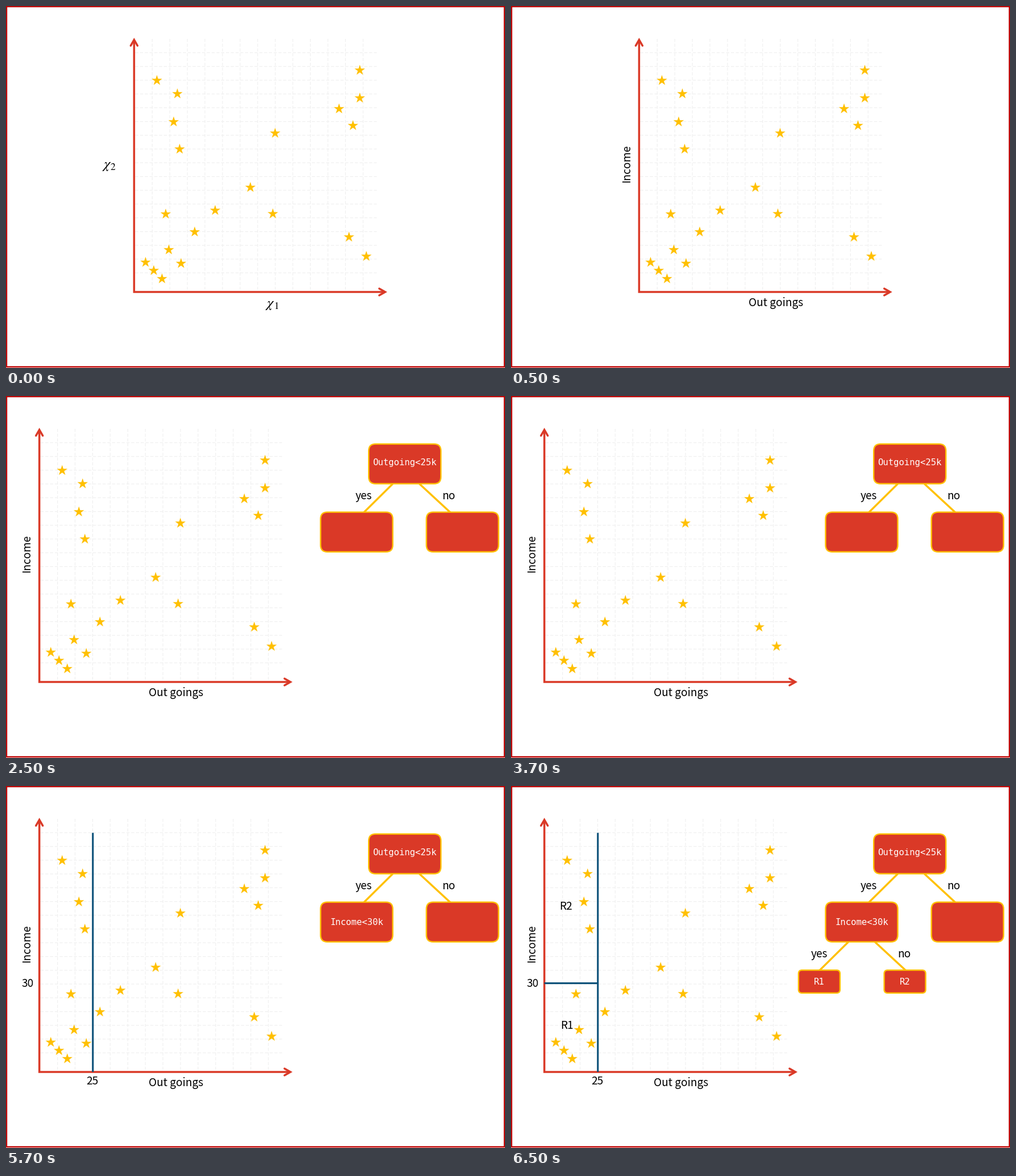
Recreate the animation shown at these times as a matplotlib script. Size 878 px wide and 638 px high, loop 8 s.

```python
import numpy as np
import matplotlib.pyplot as plt
from matplotlib.animation import FuncAnimation
from matplotlib.patches import FancyBboxPatch, Polygon, Rectangle

W, H, DPI = 878, 638, 64
PT = 72 / DPI  # points per pixel
RED, GOLD, BLUE, BORDER = "#DA3927", "#FFC000", "#0B5078", "#C00000"
SANS, MONO = "Noto Sans CJK JP", "DejaVu Sans Mono"
ORIGIN_X, ORIGIN_Y = 225.4, 504
SHIFT = -166.7  # the chart makes room for the tree
SPLIT_X, SPLIT_Y = 152.8, 347.6

# Customers: a steady low run, then the scattered ones from left to right.
STARS = [(245 + 14.5 * k, 450.5 + 14.5 * k) for k in range(3)] + [
    (265, 130), (280.5, 365.5), (286, 428.5), (294.5, 203), (301, 153.5),
    (305, 251), (307.5, 452.5), (331.5, 397), (367.5, 359), (429.5, 318.5),
    (469, 365), (473, 223), (585.5, 180), (603, 406), (610, 209.5),
    (622, 112), (622, 161), (633.5, 440)]

plt.rcParams["path.snap"] = False
fig = plt.figure(figsize=(W / DPI, H / DPI), dpi=DPI, facecolor="white")
ax = fig.add_axes([0, 0, 1, 1])


def line(points, color, width, z=2, **style):
    xs, ys = zip(*points)
    style = {"solid_capstyle": "butt", **style}
    ax.plot(xs, ys, color=color, lw=width * PT, zorder=z, **style)


def label(x, y, text, size=19.1, color="black", font=SANS, **style):
    ax.text(x, y, text, fontsize=size * PT, color=color, family=font,
            ha="center", va="baseline", zorder=5, **style)


def chi(x, y, index):
    label(x, y, r"$\chi$", 25, math_fontfamily="stix")
    label(x + 10.5, y + 3, f"${index}$", 17.5, math_fontfamily="stix")


def star(x, y, radius=9.7):
    corner = np.arange(10)
    angles = np.pi / 5 * corner - np.pi / 2
    radii = radius * np.where(corner % 2, 0.382, 1)
    outline = np.column_stack([x + radii * np.cos(angles),
                               y + radii * np.sin(angles)])
    ax.add_patch(Polygon(outline, fc=GOLD, ec="none", zorder=3))


def node(x, y, text="", w=127, h=70, rounding=12, rise=0):
    ax.add_patch(FancyBboxPatch(
        (x - w / 2, y - h / 2), w, h, fc=RED, ec=GOLD, lw=2.4 * PT, zorder=2,
        boxstyle=f"round,pad=0,rounding_size={rounding}"))
    label(x, y + 5.5 - rise, text, 15.6, "white", MONO)


def branches(x, y):
    """Yes and no links below the point (x, y)."""
    for side, near, far, word in ((-1, 21, 72, "yes"), (1, 25.5, 80, "no")):
        line([(x + side * near, y), (x + side * far, y + 50.5)], GOLD, 3.4, z=1)
        label(x + side * (far - 1) - 2 * side, y + 27, word) if side > 0 else \
            label(x - far, y + 27, word)


def chart(dx):
    x0, y0 = ORIGIN_X + dx, ORIGIN_Y
    grid = {"color": "#F0F0F0", "width": 1.2, "z": 0,
            "linestyle": (0, (4.5, 2.5))}
    for x in np.linspace(257.3, 628.3, 13) + dx:
        line([(x, 58), (x, 502)], **grid)
    for y in np.linspace(82.3, 470.3, 17):
        line([(x0 + 2, y), (x0 + 427, y)], **grid)

    axis = {"color": RED, "width": 3.5, "solid_capstyle": "round",
            "solid_joinstyle": "miter"}
    top, right = y0 - 444.5, x0 + 441.8
    line([(x0, top + 2), (x0, y0), (right - 2, y0)], **axis)
    line([(x0 - 6, top + 10.5), (x0, top), (x0 + 6, top + 10.5)], **axis)
    line([(right - 10.5, y0 - 6), (right, y0), (right - 10.5, y0 + 6)], **axis)
    for x, y in STARS:
        star(x + dx + 0.5, y + 1.3)


def draw(frame):
    step = (frame + 3) // 4
    ax.clear()
    ax.set(xlim=(0, W), ylim=(H, 0))
    ax.axis("off")
    ax.add_patch(Rectangle((1, 1), W - 2, H - 3, fc="none", ec=BORDER,
                           lw=2.4 * PT))

    dx = SHIFT if step >= 2 else 0
    chart(dx)
    if step == 0:
        chi(178, 286, 2)
        chi(464.5, 530.5, 1)
        return
    label(466 + dx, 528.5, "Out goings")
    label(209 + dx, 278, "Income", rotation=90, rotation_mode="anchor")

    if step >= 2:
        branches(701.7, 154.6)
        node(701.7, 119.6, "Outgoing<25k", rise=3)
        node(617, 239.7, "Income<30k" if step >= 3 else "")
        node(803.2, 239.7)
    if step >= 3:
        line([(SPLIT_X, 82.5), (SPLIT_X, ORIGIN_Y)], BLUE, 3.1)
        label(151.5, 526.5, "25")
        label(38, 354.5, "30")
    if step >= 4:
        line([(ORIGIN_X + dx, SPLIT_Y), (SPLIT_X, SPLIT_Y)], BLUE, 3.1)
        label(96.7, 218.5, "R2")
        label(98.2, 428.5, "R1")
        branches(614.7, 274.7)
        for x, region in ((542.4, "R1"), (693.1, "R2")):
            node(x, 344.7, region, w=73, h=40.3, rounding=6)


anim = FuncAnimation(fig, draw, frames=16, interval=500, init_func=lambda: None,
                     repeat=True, repeat_delay=0, blit=False)
plt.show()
```
